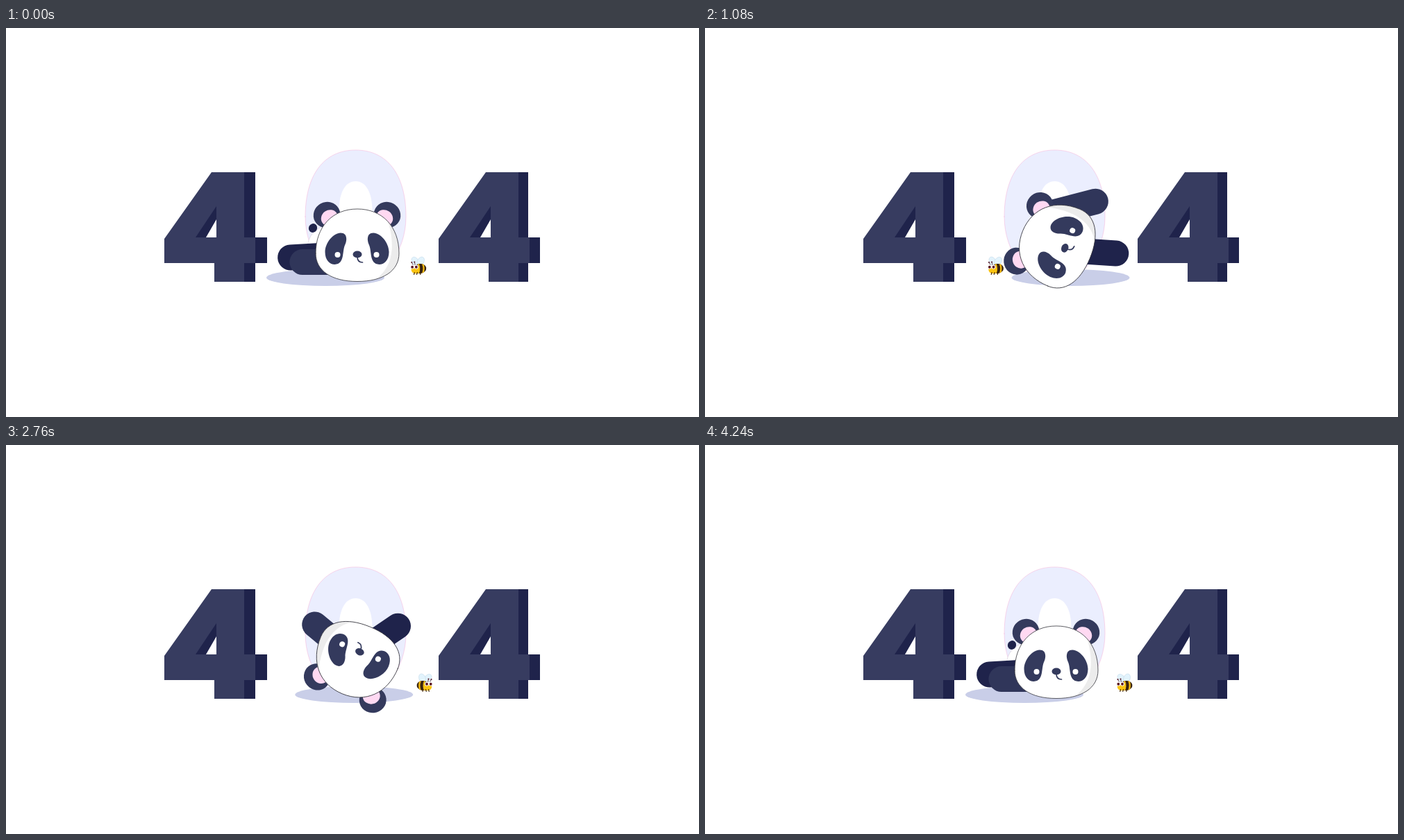
Write an HTML page with a canvas that moves like this. It is 998x561 px and loops after 4.28 s.

```html
<!DOCTYPE html>
<html lang="en">
<head>
<meta charset="utf-8">
<title>404</title>
<style>
html, body { margin: 0; width: 100%; height: 100%; overflow: hidden; background: #fff; }
canvas { display: block; width: 998px; height: 561px; }
</style>
</head>
<body>
<canvas id="stage" width="998" height="561"></canvas>
<script>
const ctx = document.getElementById('stage').getContext('2d');
const LOOP = 4280, STEP = 40;
const SLATE = '#373c60', NAVY = '#1f234b', LIMB = '#30365a', INK = '#343a5d', PINK = '#ffd9f2';

const clamp = v => Math.max(0, Math.min(1, v));
const mix = (a, b, k) => a + (b - a) * k;
const span = (t, a, b) => clamp((t - a) / (b - a));
const smooth = k => k * k * (3 - 2 * k);
const easeOut = k => 1 - (1 - k) * (1 - k);

function keyed(keys, x) {
  let i = 1;
  while (i < keys.length - 1 && x > keys[i][0]) i++;
  const [x0, y0] = keys[i - 1], [x1, y1] = keys[i];
  return mix(y0, y1, span(x, x0, x1));
}

function ellipse(x, y, rx, ry, fill, turn = 0) {
  ctx.beginPath();
  ctx.ellipse(x, y, rx, ry, turn, 0, Math.PI * 2);
  ctx.fillStyle = fill;
  ctx.fill();
}

function outline(color, width) {
  ctx.strokeStyle = color;
  ctx.lineWidth = width;
  ctx.stroke();
}

function poly(points, fill) {
  ctx.beginPath();
  points.forEach(([x, y]) => ctx.lineTo(x, y));
  ctx.closePath();
  ctx.fillStyle = fill;
  ctx.fill();
}

function capsule(x0, y0, x1, y1, r, color) {
  ctx.beginPath();
  ctx.moveTo(x0, y0);
  ctx.lineTo(x1, y1);
  ctx.lineCap = 'round';
  outline(color, r * 2);
}

// Rounded oval with separate fullness for its upper and lower halves.
function oval(x, y, rx, up, down, kUp, kDown) {
  ctx.beginPath();
  ctx.moveTo(x - rx, y);
  ctx.bezierCurveTo(x - rx, y - up * kUp, x - rx * kUp, y - up, x, y - up);
  ctx.bezierCurveTo(x + rx * kUp, y - up, x + rx, y - up * kUp, x + rx, y);
  ctx.bezierCurveTo(x + rx, y + down * kDown, x + rx * kDown, y + down, x, y + down);
  ctx.bezierCurveTo(x - rx * kDown, y + down, x - rx, y + down * kDown, x - rx, y);
  ctx.closePath();
}

function four(x, stemEnd, barFront, barEnd) {
  ctx.save();
  ctx.translate(x, 0);
  ctx.fillStyle = NAVY;
  ctx.fillRect(115, 208, stemEnd - 115, 158);
  ctx.fillRect(115, 302, barEnd - 115, 37);
  poly([[68, 208], [115, 208], [115, 302], [barFront, 302], [barFront, 339], [115, 339],
    [115, 366], [72, 366], [72, 339], [0, 339], [0, 304]], SLATE);
  poly([[75, 257], [75, 302], [45, 302]], NAVY);
  poly([[75, 276], [75, 302], [60, 302]], '#fff');
  ctx.restore();
}

function zero() {
  oval(503.5, 272, 72.5, 96, 95, 0.63, 0.54);
  ctx.fillStyle = '#ebeefe';
  ctx.fill();
  outline('rgba(246,178,216,.65)', 0.8);
  oval(503.5, 264, 24, 43, 58, 0.62, 0.6);
  ctx.fillStyle = '#fff';
  ctx.fill();
}

function head(x, y, degrees) {
  ctx.save();
  ctx.translate(x, y);
  ctx.rotate(degrees * Math.PI / 180);
  for (const s of [-1, 1]) {
    ellipse(s * 43.5, -57.5, 19.5, 18.5, INK, s * 0.5);
    ellipse(s * 39.5, -53, 12.5, 11.5, PINK, s * 0.6);
  }
  oval(0.5, -2, 60, 64, 40.5, 0.6, 0.62);
  ctx.fillStyle = '#fff';
  ctx.fill();
  ctx.save();
  ctx.clip();
  ctx.beginPath();
  ctx.moveTo(41, -60);
  ctx.bezierCurveTo(58, -12, 53, 25, 15, 42);
  ctx.lineTo(70, 42);
  ctx.lineTo(70, -60);
  ctx.fillStyle = '#ececec';
  ctx.fill();
  ctx.restore();
  oval(0.5, -2, 60, 64, 40.5, 0.6, 0.62);
  outline('#34343c', 0.8);
  for (const s of [-1, 1]) {
    ctx.save();
    ctx.scale(s, 1);
    ctx.beginPath();
    ctx.moveTo(20, -31);
    ctx.bezierCurveTo(31, -35, 46, -19, 46, -4);
    ctx.bezierCurveTo(46, 8, 39, 14, 32, 14);
    ctx.bezierCurveTo(17, 13, 22, -5, 17, -15);
    ctx.bezierCurveTo(14, -22, 15, -29, 20, -31);
    ctx.fillStyle = INK;
    ctx.fill();
    ctx.restore();
    ellipse(s * 28, 0, 4, 4, '#fff');
  }
  ellipse(0.5, -0.5, 6.5, 5, INK);
  ctx.beginPath();
  ctx.moveTo(0.5, 3);
  ctx.bezierCurveTo(0.5, 8, 3, 11, 8, 11);
  outline(INK, 1.7);
  ctx.restore();
}

function leg(degrees, reach, flat, color) {
  const a = degrees * Math.PI / 180;
  const x = 500 + reach * Math.cos(a), y = 305 + reach * Math.sin(a);
  capsule(500, mix(305, y, flat), x, y, 18.5, color);
}

const NEAR = [[0, 156], [0.157, 193.5], [0.3, 211], [0.7, 223], [0.843, 241], [1, 348]];
const FAR = NEAR.map(([x, a]) => [1 - x, 540 - a]).reverse();
FAR[0][1] = 187;
FAR[FAR.length - 1][1] = 382;

// Head positions: roll limit, x, y, rotation
const POSES = [
  [0.005, 505.5, 327, 0],
  [0.1, 492, 322, 67.5],
  [0.5, 500.5, 300.5, 157.5],
  [0.9, 510, 298, 202.5],
  [1, 518.5, 318, 292.5]
];

function panda(t) {
  const roll = smooth(span(t, 520, 1160)) - smooth(span(t, 2480, 3120));
  const flat = 1 - Math.min(1, 2.2 * Math.sin(Math.PI * clamp(roll)));
  const restLeft = 1 - smooth(span(t, 340, 540)) + smooth(span(t, 3280, 3500));
  const restRight = smooth(span(t, 1160, 1400)) - smooth(span(t, 2230, 2460));

  ellipse(mix(460, 529.5, roll), 360, 85, 12, '#c9cee8');

  ellipse(mix(504, mix(462, 546, roll), flat), mix(306, mix(318, 310, roll), flat), 28, 32, '#fff');
  outline('#d9cfdd', 0.7);
  if (roll <= 0.005) ellipse(442, 288.5, 6, 6.5, NAVY, 0.5);

  leg(keyed(FAR, roll) - 23 * restLeft, mix(78, 94 + 7 * roll, flat), flat * 0.8 + roll * flat * 0.2, NAVY);
  leg(keyed(NEAR, roll) + 18 * restRight, mix(72, 80 + 8 * roll, flat), flat, LIMB);

  const pose = POSES.find(p => roll <= p[0]) || POSES[POSES.length - 1];
  head(pose[1], pose[2], pose[3]);
}

function bee(t) {
  const back = t >= 1720 && t < 4240;
  const since = t >= 4240 ? t - 4240 : t + 40;
  const x = back ? mix(402, 603.5, easeOut(span(t, 1720, 2240)))
    : mix(603.5, 402, easeOut(span(since, 0, 1560)));
  const flap = Math.sin(t / STEP * 1.7) * 0.12;

  ctx.save();
  ctx.translate(x, 345);
  if (back) ctx.scale(-1, 1);

  for (const [wx, turn] of [[-4, -0.55], [4, 0.5]]) {
    ellipse(wx, -8.5, 4.7, 6.8, '#e2f3fc', turn + flap);
    outline('#c5dbea', 0.6);
  }

  ctx.save();
  ctx.beginPath();
  ctx.ellipse(3, 2, 9, 7, -0.15, 0, Math.PI * 2);
  ctx.fillStyle = '#392410';
  ctx.fill();
  ctx.clip();
  for (const sx of [0, 6.5]) {
    ctx.beginPath();
    ctx.moveTo(sx - 0.5, -7);
    ctx.quadraticCurveTo(sx + 4, 2, sx - 0.5, 11);
    outline('#f6bd13', 2.3);
  }
  ctx.restore();

  ellipse(-3.5, 3.5, 6.2, 5.5, '#fac411');
  ctx.beginPath();
  for (const lx of [-5, -1, 4]) {
    ctx.moveTo(lx, 7.5);
    ctx.lineTo(lx - 0.8, 10.5);
  }
  outline('#4a2d0c', 1.2);

  ctx.beginPath();
  ctx.moveTo(-7, -3);
  ctx.lineTo(-9, -7);
  ctx.moveTo(-4, -3);
  ctx.lineTo(-5, -7.5);
  outline('#4d2230', 0.8);
  ellipse(-9, -7, 1.1, 1.1, '#5b2130');
  ellipse(-5, -7.5, 1.1, 1.1, '#5b2130');
  for (const ex of [-8.2, -2.5]) {
    ellipse(ex, -0.5, 3, 3.1, '#fff');
    ellipse(ex, -0.3, 1.9, 2, '#5a1420');
  }
  ctx.restore();
}

function draw(t) {
  ctx.fillStyle = '#fff';
  ctx.fillRect(0, 0, 998, 561);
  four(228, 131, 131, 148);
  four(623, 129, 131, 146);
  zero();
  panda(t);
  bee(t);
}

const start = performance.now();
function tick() {
  const t = (performance.now() - start) % LOOP;
  draw(Math.floor(t / STEP) * STEP);
  requestAnimationFrame(tick);
}
tick();
</script>
</body>
</html>
```
